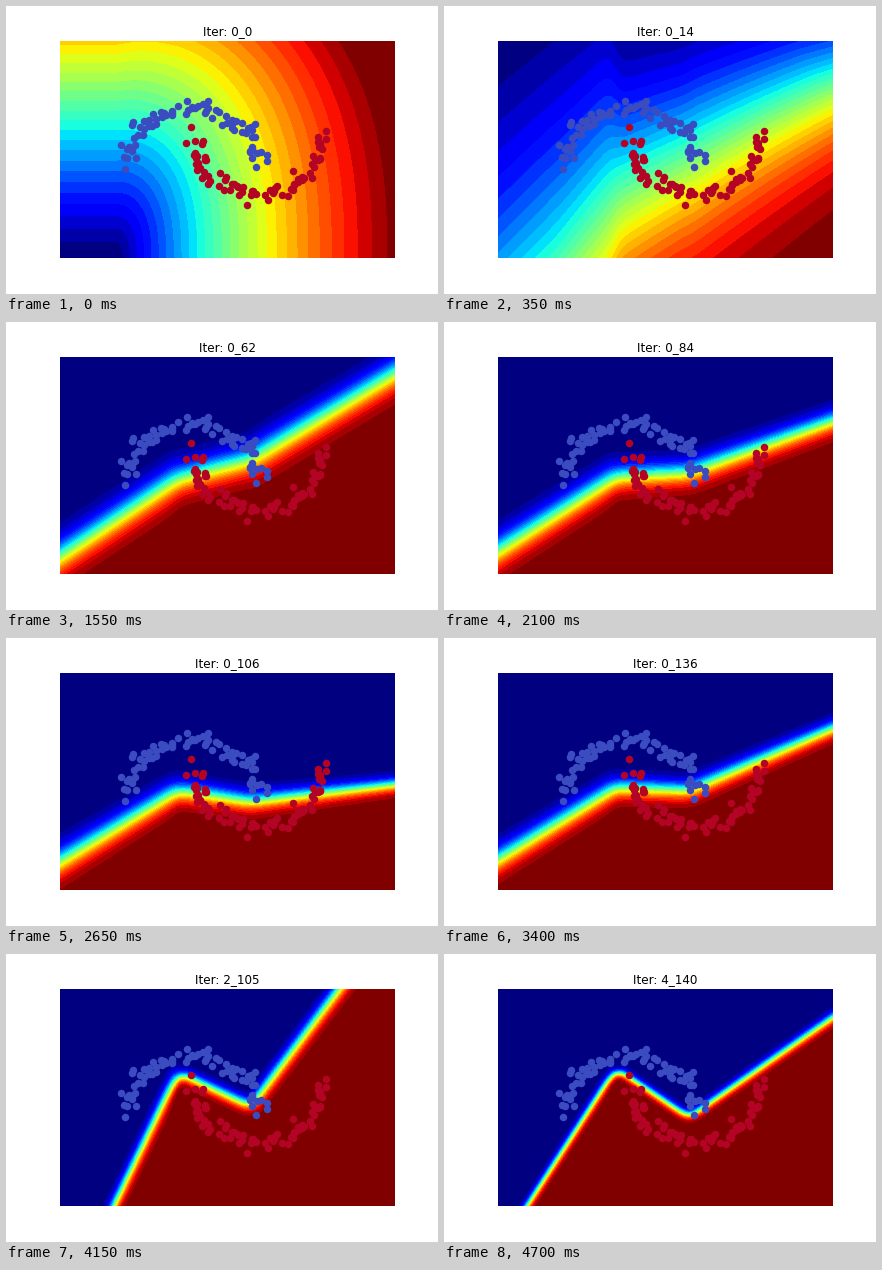
Write a matplotlib script that moves like this. It is 432 px wide and 288 px high and loops after 4750 ms.

```python
import numpy as np
import matplotlib.pyplot as plt
from matplotlib.animation import FuncAnimation

W, H, DPI = 432, 288, 72
LEFT, RIGHT, TOP, BOTTOM = 54, 388.8, 34.56, 252
BATCHES = 150
BANDS = 30

# The decision boundary bends at KNOTS. Each key holds a training step,
# the boundary height at every knot, and its softness at the left and right.
KNOTS = [LEFT, 172, 245, RIGHT]
KEYS = np.array([
    [34, 280, 178, 155, 96, 12, 6.5],
    [62, 235, 157, 138, 52, 8.3, 8],
    [106, 224, 153, 164, 147, 7.2, 4],
    [136, 222, 150, 153, 91, 6.4, 4.4],
    [405, 366, 119, 153, -38, 2.8, 4.2],
    [740, 298, 115, 164, 64, 2.1, 2.8],
])

xs = np.linspace(LEFT, RIGHT, 168)
ys = np.linspace(TOP, BOTTOM, 109)


def smooth(values, sigma=3, pad=9):
    kernel = np.exp(-0.5 * (np.arange(-pad, pad + 1) / sigma) ** 2)
    padded = np.pad(values, pad, mode="reflect", reflect_type="odd")
    return np.convolve(padded, kernel / kernel.sum(), mode="valid")


def untrained_logit():
    """Rises upwards on the left and sideways further right."""
    b = np.clip((xs - 110) / (RIGHT - 110), 0, 1)
    a = ((BOTTOM - ys) / (BOTTOM - TOP))[:, None]
    across = b * (1.4 - 0.4 * b)
    up = 0.69 * a ** 1.15 * (1 - 0.3 * b)
    rise = (across ** 2.2 + up ** 2.2) ** (1 / 2.2)
    return np.minimum(rise, 1.02) - 0.5


def prediction(step):
    key = [np.interp(step, KEYS[:, 0], column) for column in KEYS.T[1:]]
    line = smooth(np.interp(xs, KNOTS, key[:4]))
    slope = np.gradient(line, xs)
    soft = np.interp(xs, [LEFT, RIGHT], key[4:]) * np.hypot(1, slope)
    trained = (ys[:, None] - line) / soft
    share = min(step / KEYS[0, 0], 1) ** 2
    logit = (1 - share) * START + share * trained
    return 1 / (1 + np.exp(-np.clip(logit, -40, 40)))


def moon(cx, cy, side, count=75, spread=4.8):
    """Noisy half ellipse, opening down for side 1 and up for side -1."""
    t = np.linspace(0, np.pi, count)
    x = cx - side * 65 * np.cos(t) + rng.normal(0, spread, count)
    y = cy - side * 57 * np.sin(t) + rng.normal(0, spread, count)
    return x, y


START = untrained_logit()
rng = np.random.default_rng(4)
schedule = [(0, b) for b in range(0, BATCHES, 2)]
schedule += [(e, b) for e in range(1, 5) for b in range(0, BATCHES, 35)]

fig = plt.figure(figsize=(W / DPI, H / DPI), dpi=DPI, facecolor="white")
ax = fig.add_axes([LEFT / W, 1 - BOTTOM / H, (RIGHT - LEFT) / W, (BOTTOM - TOP) / H])
ax.axis("off")
title = ax.set_title("", fontsize=12, fontfamily="DejaVu Sans")
for (cx, cy, side), color in (((187, 158, 1), "#3b4cc0"), ((251, 129, -1), "#b40426")):
    ax.scatter(*moon(cx, cy, side), s=36, color=color, linewidths=1.5, zorder=3)

layers = []


def draw(i):
    while layers:
        layers.pop().remove()
    epoch, batch = schedule[i]
    field = prediction(epoch * BATCHES + batch)
    levels = np.linspace(field.min(), field.max(), BANDS + 1)
    # Trim the colour range so the outer bands take the darkest tones
    trim = 0.4 * (levels[1] - levels[0])
    layers.append(ax.contourf(xs, ys, field, levels, cmap="jet", zorder=1,
                              vmin=levels[0] + trim, vmax=levels[-1] - trim))
    ax.set_xlim(LEFT, RIGHT)
    ax.set_ylim(BOTTOM, TOP)
    title.set_text(f"Iter: {epoch}_{batch}")
    return [title]


anim = FuncAnimation(fig, draw, frames=len(schedule), init_func=lambda: [],
                     interval=50, repeat=True, repeat_delay=0)
plt.show()
```
